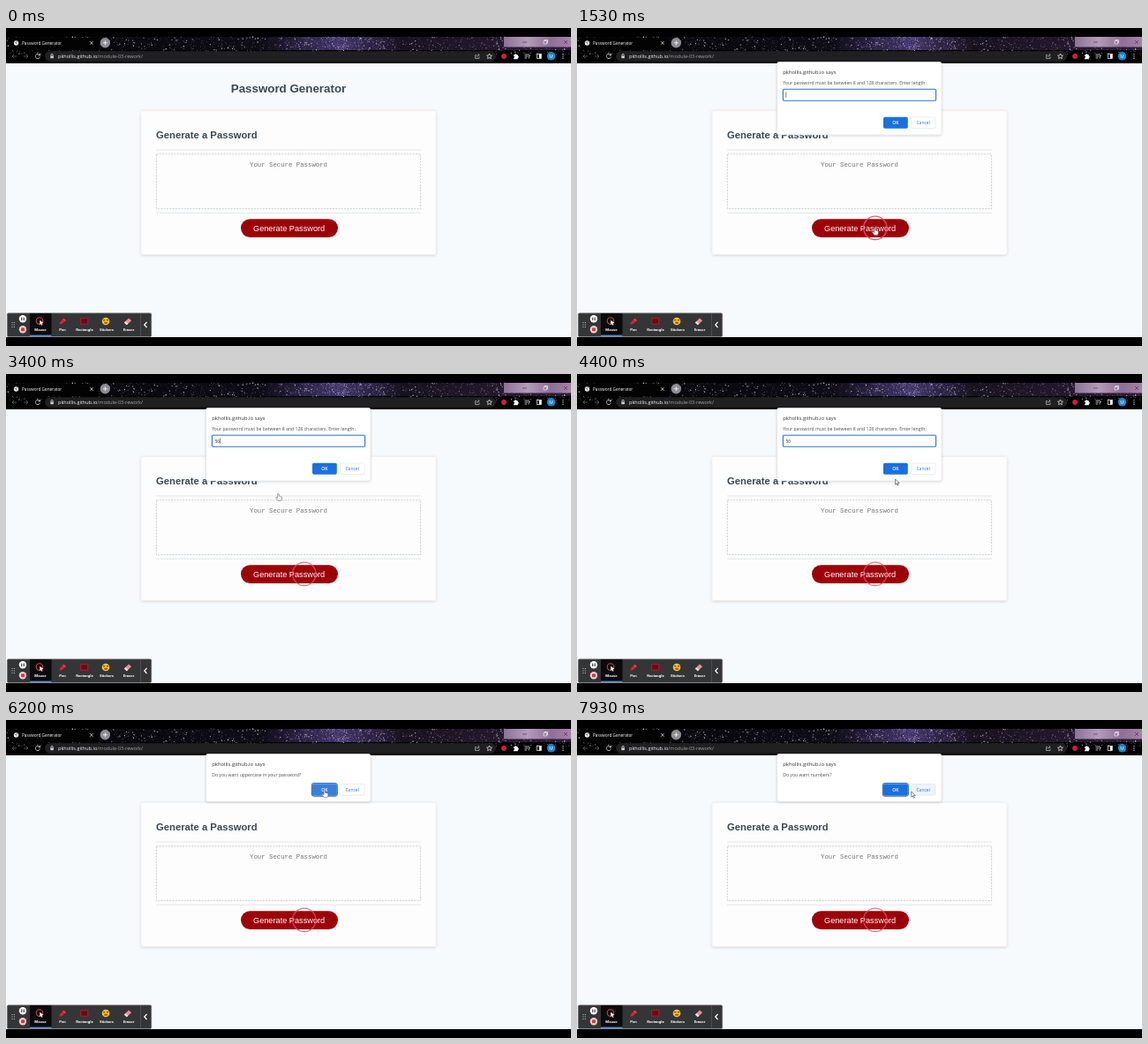
An HTML page that plays this animation: 640x360 px, repeating every 8000 ms.

```html
<!DOCTYPE html>
<html lang="en">
<head>
<meta charset="utf-8">
<title>Password Generator demo</title>
<style>
  html, body { margin: 0; width: 100%; height: 100%; overflow: hidden; background: #000; }
  svg { display: block; width: 100vw; height: 100vh; }
  text { font-family: "Open Sans", sans-serif; }
  .page { font-family: "Liberation Sans", Arial, sans-serif; }
  .mono { font-family: "Liberation Mono", monospace; }
  .tool { font: 700 4.35px Roboto, sans-serif; fill: #fff; text-anchor: middle; }
  .mid { text-anchor: middle; }
  .line { fill: none; stroke: #ddd; stroke-width: .8; }
</style>
</head>
<body>
<svg viewBox="0 0 640 360">
  <defs>
    <filter id="shadow" x="-10%" y="-10%" width="120%" height="130%">
      <feDropShadow dx="0" dy=".8" stdDeviation="1.5" flood-opacity=".16"/>
    </filter>
    <linearGradient id="sky">
      <stop offset="0" stop-color="#050507"/><stop offset=".45" stop-color="#0e0c16"/>
      <stop offset=".59" stop-color="#40336a"/><stop offset=".7" stop-color="#18121f"/>
      <stop offset="1" stop-color="#2b1c36"/>
    </linearGradient>
    <linearGradient id="controls">
      <stop offset="0" stop-color="#8d7397"/><stop offset=".35" stop-color="#b49cba"/>
      <stop offset=".7" stop-color="#8f6f97"/><stop offset="1" stop-color="#a584a6"/>
    </linearGradient>
  </defs>

  <!-- Browser frame -->
  <rect width="640" height="360"/>
  <rect y="10" width="640" height="15" fill="url(#sky)"/>
  <g id="stars"></g>
  <path d="M4 25V13q0-2 2-2H103q2 0 2 2V25z" fill="#030304"/>
  <rect x="564" y="10" width="76" height="11.5" fill="url(#controls)"/>
  <g fill="none" stroke="#4a3850" stroke-width=".7">
    <path d="M585 16h5M632 14l4 4m0-4l-4 4"/>
    <path d="M609 14.5h3.5v3.5h-3.5zM610 14.5v-1h3.5v3.5h-1" stroke="#eee"/>
  </g>
  <circle cx="11.5" cy="17" r="2.7" fill="#fff"/>
  <path d="M9.5 16l2 .5.5 2M11.5 14.6l1.5 1.6" stroke="#333" stroke-width=".7" fill="none"/>
  <text x="18" y="18.7" font-size="4.75" fill="#fff">Password Generator</text>
  <path class="line" d="M95 15.2l3.6 3.6m0-3.6l-3.6 3.6"/>
  <circle cx="112.3" cy="16.8" r="5.7" fill="#8e8e92"/>
  <path class="line" d="M109.8 16.8h5M112.3 14.3v5" style="stroke:#fff"/>
  <path class="line" d="M12 32H7m2.3-2.3L7 32l2.3 2.3M20 32h5m-2.3-2.3L25 32l-2.3 2.3" style="stroke:#666"/>
  <path class="line" d="M38 30.4a2.6 2.6 0 1 0 .5 2.2M38.5 29v2h-2"/>
  <rect x="44" y="26.3" width="511" height="11.4" rx="5.7" fill="#202022"/>
  <rect x="50.3" y="31.4" width="3.6" height="2.8" fill="#ccc"/>
  <path class="line" d="M51 31.5v-1a1.1 1.1 0 0 1 2.2 0v1" stroke-width=".6"/>
  <text x="59" y="33.8" font-size="5.55" fill="#a4a4a7"><tspan fill="#f6f6f6">pkhollis.github.io</tspan>/module-03-rework/</text>
  <path class="line" d="M533 30.5h-1.5v4h4.5v-2M533 33q.3-2.5 3-2.5m-1.2-1.3l1.4 1.3-1.4 1.3" style="stroke:#aaa"/>
  <path class="line" d="M547.5 29l.9 2 2.1.2-1.6 1.4.5 2.1-1.9-1.1-1.9 1.1.5-2.1-1.6-1.4 2.1-.2z"/>
  <circle cx="564" cy="32" r="2.9" fill="#d81c36"/>
  <path d="M575 30.3h1.4a1 1 0 0 1 2 0h1.4v1.5a1 1 0 0 1 0 2v1.4h-4.8v-1.4a1 1 0 0 0 0-2z" fill="#fff"/>
  <path class="line" d="M587.5 30h5.5M587.5 32h3.5M587.5 34h2.5M592.2 34.5v-3h1.6"/>
  <rect class="line" x="601.3" y="29.5" width="5" height="5"/>
  <rect x="604" y="29.5" width="2.3" height="5" fill="#fff"/>
  <circle cx="617.5" cy="31.8" r="4.8" fill="#1785c9"/>
  <text class="mid" x="617.5" y="33.6" font-size="5" fill="#fff">M</text>
  <path d="M631 29.6v.1M631 31.9v.1M631 34.2v.1" stroke="#eee" stroke-width="1.2" stroke-linecap="round"/>

  <!-- Page -->
  <rect y="40" width="640" height="310" fill="#f7fafc"/>
  <text class="page mid" x="320" y="73" font-size="13.35" font-weight="700" fill="#3b4853">Password Generator</text>
  <rect x="153" y="93.5" width="334" height="163" rx="2" fill="#fdfdfe" stroke="#e6e9ec" stroke-width=".5" filter="url(#shadow)"/>
  <text class="page" x="170" y="125.3" font-size="11.28" font-weight="700" fill="#3b4853">Generate a Password</text>
  <path d="M170 138h300M170 209.2h300" stroke="#dfe1e3" stroke-width=".9"/>
  <rect x="170.4" y="142.8" width="299.2" height="61.8" fill="none" stroke="#c6c9c8" stroke-width=".9" stroke-dasharray="2 1.3"/>
  <text class="mono mid" x="320" y="157" font-size="7.33" fill="#737373">Your Secure Password</text>
  <rect x="266" y="216.3" width="110" height="20.6" rx="10.3" fill="#9d0209"/>
  <text class="page mid" x="320.6" y="229.5" font-size="9.2" fill="#fff">Generate Password</text>
  <circle id="ring" cx="337.8" cy="226.3" r="13.2" fill="none" stroke="#e2506a" stroke-width="1.4"/>

  <!-- Recorder toolbar -->
  <rect x="1.3" y="322.8" width="163.4" height="26.6" rx="1.5" fill="#343537" stroke="#77797c" stroke-width=".6"/>
  <rect x="27" y="323" width="24.5" height="26" fill="#0b0b0d"/>
  <rect x="27" y="347.6" width="24.5" height="1.4" fill="#5d8fd6"/>
  <path d="M152.5 323v26" stroke="#58595c" stroke-width=".7"/>
  <path d="M7 333v6M9.4 333v6" stroke="#bbb" stroke-width="1.1" stroke-dasharray="1.1 1.35"/>
  <circle cx="19" cy="329.3" r="4.2" fill="#fff"/>
  <circle cx="19" cy="341.3" r="4.2" fill="#f3cfd1"/>
  <path d="M17.8 327.6v3.4M20.2 327.6v3.4" stroke="#222" stroke-width="1"/>
  <rect x="17.1" y="339.4" width="3.8" height="3.8" fill="#dc3340"/>
  <circle cx="38" cy="331.6" r="3.8" fill="none" stroke="#d8404a" stroke-width="1.1"/>
  <path d="M38.3 330.8l4.2 3.2-2 .2 1 2.1-1 .4-.9-2-1.3 1.2z" fill="#fff"/>
  <path d="M60.3 335.7l1-3 4.5-4.2 2.2 2.2-4.5 4.3z" fill="#e31f32"/>
  <path d="M64.8 329.3l2.2 2.3" stroke="#f2a0a8" stroke-width=".6"/>
  <rect x="84.7" y="328.6" width="8" height="6.6" fill="#5c1018" stroke="#b3152a" stroke-width="1.2"/>
  <circle cx="113" cy="332" r="4.3" fill="#fbc52d"/>
  <path d="M110 330.8h2.3M113.8 330.8h2.3" stroke="#3c2a14" stroke-width="1.1"/>
  <path d="M110.8 332.8h4.6a2.3 2.3 0 0 1-4.6 0z" fill="#b5502d"/>
  <path d="M133.8 333.4l5.2-5 3 2.8-5.2 5z" fill="#ee8d9c"/>
  <path d="M133.8 333.4l1.6-1.5 3 2.8-1.6 1.5z" fill="#f5dfe2"/>
  <text class="tool" x="39" y="342.8">Mouse</text>
  <text class="tool" x="64" y="342.8">Pen</text>
  <text class="tool" x="89" y="342.8">Rectangle</text>
  <text class="tool" x="114" y="342.8">Stickers</text>
  <text class="tool" x="139" y="342.8">Eraser</text>
  <path d="M159.5 333l-2.8 3 2.8 3" fill="none" stroke="#fff" stroke-width="1.2"/>

  <!-- Dialog -->
  <g id="dialog">
    <rect id="panel" x="226.5" y="38.3" width="186.5" rx="2.5" fill="#fff" stroke="#cfd2d4" stroke-width=".5" filter="url(#shadow)"/>
    <text x="233.2" y="52" font-size="5.9" fill="#303236">pkhollis.github.io says</text>
    <text id="message" x="233.2" y="63.7" font-size="5.13" fill="#4c4e52"></text>
    <g id="field">
      <rect x="233.4" y="69.3" width="173.2" height="13" rx="1.3" fill="#fff" stroke="#2e75c9" stroke-width="1.1"/>
      <text id="typed" x="236.4" y="77.6" font-size="5" fill="#333"></text>
      <path id="caret" stroke="#222" stroke-width=".6"/>
    </g>
    <g id="buttons">
      <rect id="focus" x="346.3" y="-.8" width="29" height="14.6" rx="2.2" fill="#a9c8f4" stroke="#1f559f" stroke-width=".9"/>
      <rect id="ok" x="347" width="27.8" height="13" rx="1.8"/>
      <text class="mid" x="360.8" y="8.3" font-size="5" font-weight="600" fill="#fff">OK</text>
      <rect id="cancel" x="378.4" y=".2" width="27.6" height="12.6" rx="1.8" stroke="#dcdfe3" stroke-width=".6"/>
      <text class="mid" x="392.2" y="8.3" font-size="5" fill="#2f70c8">Cancel</text>
    </g>
  </g>

  <g id="cursor" fill="#fff" stroke-width=".6" stroke-linejoin="round">
    <path id="arrow" stroke="#333" d="M0 0V6.2L1.5 4.9 2.5 7.1 3.5 6.6 2.5 4.5H4.4z"/>
    <path id="hand" stroke="#666" d="M-.7.6Q0-.5.7.6V3.2Q1.5 2.7 1.9 3.5 2.7 3 3.1 3.8 4.1 3.5 4.1 4.7V6.3L3.2 8.4H-.5L-2.7 5.5Q-2.8 4.3-1.6 4.7L-.7 5.5z"/>
  </g>
</svg>
<script>
const LOOP = 8000;
const el = id => document.getElementById(id);
const show = (id, on) => { el(id).style.display = on ? "" : "none"; };
const set = (id, attrs) => {
  for (const name in attrs) el(id).setAttribute(name, attrs[name]);
};
const within = (t, from, to) => t >= from && t < to;

// Seeded star field, with a violet cluster right of the middle.
let seed = 17;
const random = () => (seed = seed * 16807 % 2147483647) / 2147483647;
let stars = "";
for (let i = 0; i < 1700; i++) {
  const clustered = random() < .2;
  const x = clustered ? 378 + 70 * (random() + random() - 1) : 640 * random();
  const y = 10 + random() * (clustered ? 14.5 : 20);
  const tint = clustered || x > 400 && random() < .5 ? "#b3a2d6" : "#f0eef6";
  stars += `<circle cx="${x}" cy="${y}" r="${.25 + .5 * random() ** 3}" fill="${tint}" opacity="${.3 + .65 * random()}"/>`;
}
el("stars").innerHTML = stars;

const dialogs = [
  { start: 1270, message: "Your password must be between 8 and 128 characters. Enter length:", prompt: true },
  { start: 4980, message: "Do you want lowercase in your password?" },
  { start: 6030, message: "Do you want uppercase in your password?" },
  { start: 7200, message: "Do you want numbers?" }
];

// Pointer tip: time, x, y
const path = [
  [60, 430, 346], [500, 372, 262], [930, 337.3, 226], [1730, 337.3, 226],
  [2400, 308.4, 135], [3800, 308.4, 135], [4400, 360.6, 119], [4650, 360, 108],
  [5000, 359, 108], [5200, 357.5, 109], [5750, 360, 80], [6400, 361, 79],
  [6860, 378.8, 79.4], [7130, 378.8, 81], [LOOP, 378.8, 81]
];

function pointerAt(t) {
  const next = Math.max(1, path.findIndex(p => p[0] > t));
  const [t0, x0, y0] = path[next - 1], [t1, x1, y1] = path[next];
  const u = (t - t0) / (t1 - t0), k = u * u * (3 - 2 * u);
  return [x0 + (x1 - x0) * k, y0 + (y1 - y0) * k];
}

function drawDialog(t) {
  const current = dialogs.filter(d => t >= d.start).pop();
  show("dialog", current);
  if (!current) return;
  const prompt = !!current.prompt;
  set("panel", { height: prompt ? 82.7 : 54.2 });
  set("buttons", { transform: `translate(0 ${prompt ? 100.7 : 72.4})` });
  el("message").textContent = current.message;
  show("field", prompt);
  show("focus", !prompt);

  const typed = "56".slice(0, t < 3330 ? 0 : t < 3400 ? 1 : 2);
  el("typed").textContent = typed;
  set("caret", { d: `M${236.8 + typed.length * 2.9} 72.6v6` });
  show("caret", within(t, 1270, 1830) || within(t, 2330, 2860) ||
    within(t, 3330, 3900) || t >= 4430);

  const okHover = within(t, 4560, 4980) || within(t, 5500, 6950);
  set("ok", { fill: okHover ? "#397fdb" : "#1a70df" });
  set("cancel", { fill: t >= 6950 ? "#edf3fd" : "#fff" });
}

function draw(t) {
  drawDialog(t);
  show("ring", t >= 1200);
  const settle = Math.min(1, Math.max(0, (t - 1200) / 200));
  set("ring", { r: 8 + 5.2 * settle, opacity: t < 1730 ? .9 : .75 });

  show("cursor", t >= 60);
  if (t < 60) return;
  const [x, y] = pointerAt(t);
  set("cursor", { transform: `translate(${x} ${y})` });
  const hand = within(t, 780, 3800) || within(t, 4560, 6650);
  show("hand", hand);
  show("arrow", !hand);
}

function tick() {
  draw(performance.now() % LOOP);
  requestAnimationFrame(tick);
}
tick();
</script>
</body>
</html>
```
